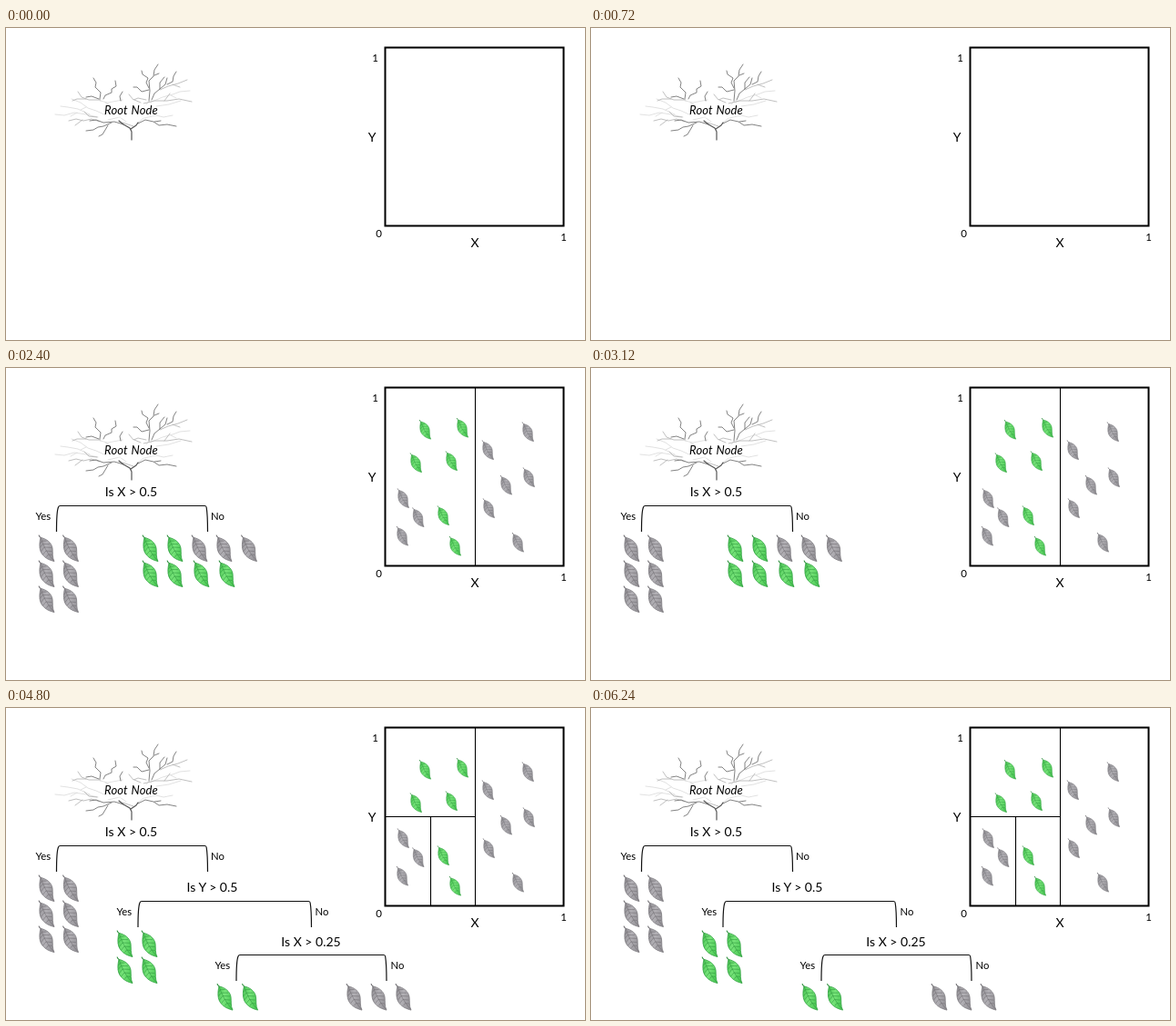
An HTML page for the animation above (7.2 s loop, 636 px wide and 343 px high).

```html
<!DOCTYPE html>
<html lang="en">
<head>
<meta charset="utf-8">
<title>Decision tree</title>
<style>
html, body { margin: 0; width: 100%; height: 100%; overflow: hidden; background: #fff; }
svg { display: block; width: 636px; height: 343px; font-family: Lato, "Open Sans", sans-serif; }
.line { fill: none; stroke: #000; stroke-width: 1.1; }
.bracket { fill: none; stroke: #111; stroke-width: 1.2; }
.twigs { fill: none; stroke-linecap: round; stroke-linejoin: round; }
.root { font-size: 13px; font-style: italic; letter-spacing: .1px; word-spacing: .8px; text-anchor: middle; }
.ask { font-size: 14px; text-anchor: middle; }
.small { font-size: 11.3px; }
.num { font-size: 11.5px; text-anchor: middle; }
.step { opacity: 0; animation: 7200ms step-end infinite; }
.all { animation-name: all; }
.pool { animation-name: pool; }
.x5 { animation-name: x5; }
.x5rest { animation-name: x5rest; }
.y5 { animation-name: y5; }
.y5rest { animation-name: y5rest; }
.x25 { animation-name: x25; }
@keyframes all { 0% { opacity: 0 } 16.6667%, 100% { opacity: 1 } }
@keyframes pool { 0% { opacity: 0 } 16.6667% { opacity: 1 } 33.3333%, 100% { opacity: 0 } }
@keyframes x5 { 0% { opacity: 0 } 33.3333%, 100% { opacity: 1 } }
@keyframes x5rest { 0% { opacity: 0 } 33.3333% { opacity: 1 } 50%, 100% { opacity: 0 } }
@keyframes y5 { 0% { opacity: 0 } 50%, 100% { opacity: 1 } }
@keyframes y5rest { 0% { opacity: 0 } 50% { opacity: 1 } 66.6667%, 100% { opacity: 0 } }
@keyframes x25 { 0% { opacity: 0 } 66.6667%, 100% { opacity: 1 } }
</style>
</head>
<body>
<svg viewBox="0 0 636 343">
  <defs>
    <linearGradient id="greenFill" x1="0" y1="0" x2="1" y2=".35">
      <stop offset="0" stop-color="#4cc655"/><stop offset=".5" stop-color="#78e47a"/><stop offset="1" stop-color="#4fcb58"/>
    </linearGradient>
    <linearGradient id="grayFill" x1="0" y1="0" x2="1" y2=".35">
      <stop offset="0" stop-color="#929095"/><stop offset=".5" stop-color="#b3b1b6"/><stop offset="1" stop-color="#97959a"/>
    </linearGradient>
    <path id="blade" d="M-6-11.6C0-10.4 6-6.4 7 0C7.6 5 6.6 10 9 14.6C4 13.2-.4 11.6-4 7C-7.8 2.4-7.6-5-6-11.6Z"/>
    <path id="stem" d="M-8-14.4Q-7.4-12.6-6-11.6"/>
    <path id="veins" d="M-6-11.6Q-2 2 8.4 13.8M-4.7-7.8L.6-8M-3.5-4.4L4-4.4M-2-1L6.2-.6M-.2 3L6.6 3.6M2.6 7L6.8 7.6M-4.7-7.8L-6.6-5M-3.5-4.4L-6.8-.6M-2-1L-5.6 3.6M-.2 3L-3.2 7M2.6 7L.4 9.8"/>
    <g id="green" fill="none" stroke-width=".8">
      <use href="#blade" fill="url(#greenFill)" stroke="#2fa03f"/>
      <use href="#veins" stroke="#2f9a3e" stroke-width=".6"/>
      <use href="#stem" stroke="#278a36" stroke-width="1.1"/>
    </g>
    <g id="gray" fill="none" stroke-width=".8">
      <use href="#blade" fill="url(#grayFill)" stroke="#7b797e"/>
      <use href="#veins" stroke="#727075" stroke-width=".6"/>
      <use href="#stem" stroke="#68666b" stroke-width="1.1"/>
    </g>
  </defs>

  <rect width="636" height="343" fill="#fff"/>

  <g class="twigs" stroke="#dadada" stroke-width=".8">
    <path d="M110 96L99 91L90 88L82 82L72 78M101 98L88 95L75 93L64 96L54 95M92 95L79 89L68 87L60 86M78 93L71 97"/>
    <path d="M158 82L172 76L183 73L191 70L202 69M152 99L165 96L173 98L183 96M165 86L179 84L192 80M112 101L125 98L132 103M144 105L151 99"/>
    <path d="M109 82L116 86L122 92M158 80L151 87M88 87L82 90M181 74L187 77M103 80L112 82L128 79"/>
  </g>
  <g class="twigs" stroke="#b0b0b0" stroke-width=".8">
    <path d="M151 83L163 80L177 80L190 78L204 81M169 68L178 64L189 61L199 57M183 62L191 65M154 79L145 77L140 79L135 73"/>
    <path d="M103 103L94 100L85 102L77 100L69 102M84 101L76 107M100 98L91 97L86 92M128 104L140 108"/>
    <path d="M104 79L91 79L83 76L79 70M88 78L78 78L73 80M141 79L148 82M174 80L180 72"/>
  </g>
  <g class="twigs" stroke="#747474" stroke-width=".9">
    <path d="M157 80L158 69L157 58L162 53L163 46L167 40M157 66L154 60L156 55L150 51L149 47M157 68L149 70L144 65L140 65M163 52L168 50"/>
    <path d="M160 79L163 72L169 67L169 60L174 54M169 67L175 62L177 55M177 62L183 59L184 53L187 48"/>
    <path d="M103 78L104 71L98 65L99 60L96 55M107 78L109 74L116 71L116 67L121 64L120 58M102 78L94 75L88 76M126 80L125 75L128 70"/>
    <path d="M129 106L119 103L107 104L99 101L92 102M116 104L107 108L101 109L96 112L88 113M112 107L109 112L106 117L102 119"/>
    <path d="M145 105L153 101L162 103L168 107L177 106L187 108M163 103L170 102"/>
  </g>
  <path class="twigs" d="M138 123V114L136 110L129 106L124 102M137 111L143 107L145 104" stroke="#555" stroke-width="1.2"/>
  <ellipse cx="137" cy="91" rx="33" ry="8" fill="#fff" opacity=".75"/>
  <text class="root" x="137.500" y="95">Root Node</text>

  <rect x="416.500" y="21.500" width="196" height="196" fill="none" stroke="#000" stroke-width="2"/>
  <g class="num">
    <text x="405.500" y="37">1</text>
    <text x="409.500" y="229.500">0</text>
    <text x="612.500" y="233.500">1</text>
  </g>
  <text class="ask" x="402" y="125">Y</text>
  <text class="ask" x="515" y="240.500">X</text>

  <g class="step all" id="all"></g>
  <g class="step pool" id="pool"></g>
  <g class="step x5" id="x5">
    <path class="line" d="M515.500 22V217"/>
    <text class="ask" x="137.500" y="141">Is X &gt; 0.5</text>
  </g>
  <g class="step x5rest" id="x5rest"></g>
  <g class="step y5" id="y5">
    <path class="line" d="M417 119.500H515.500"/>
    <text class="ask" x="226.500" y="202">Is Y &gt; 0.5</text>
  </g>
  <g class="step y5rest" id="y5rest"></g>
  <g class="step x25" id="x25">
    <path class="line" d="M466.500 120V217"/>
    <text class="ask" x="335" y="261.500">Is X &gt; 0.25</text>
  </g>
</svg>
<script>
const NS = "http://www.w3.org/2000/svg";

function add(id, tag, attrs, text = "") {
  const el = document.createElementNS(NS, tag);
  for (const key in attrs) el.setAttribute(key, attrs[key]);
  el.textContent = text;
  document.getElementById(id).append(el);
}

function leaf(id, kind, x, y, scale = 1) {
  add(id, "use", { href: "#" + kind, transform: `translate(${x} ${y}) scale(${scale})` });
}

function row(id, kind, y, xs) {
  for (const x of xs) leaf(id, kind, x, y);
}

function branch(id, left, right, top, yesX, noX) {
  const d = `M${left} ${top + 28.5}Q${left} ${top + 6} ${left + 2} ${top + 1.5}Q${left + 2.5} ${top} ${left + 4} ${top}` +
    `H${right - 3}Q${right - 1.5} ${top} ${right - 1.3} ${top + 2}Q${right} ${top + 10} ${right} ${top + 28.5}`;
  add(id, "path", { class: "bracket", d });
  add(id, "text", { class: "small", x: yesX, y: top + 15.5 }, "Yes");
  add(id, "text", { class: "small", x: noX, y: top + 15.5 }, "No");
}

const plot = {
  green: [[460, 67.5], [501, 65.5], [450, 104], [489, 102], [480, 162], [493, 195.5]],
  gray: [[573, 70], [529, 90], [549, 128.5], [574, 120], [530, 154], [436, 143],
    [452.5, 164], [435, 184.5], [562, 191.5]]
};
for (const kind in plot)
  for (const [x, y] of plot[kind]) leaf("all", kind, x, y, .73);

row("pool", "gray", 142.5, [42, 69, 96, 178, 205, 232]);
row("pool", "green", 142.5, [123.5, 151]);
row("pool", "gray", 171, [42, 69, 96]);
row("pool", "green", 171, [123.5, 151, 179.5, 207.5]);

branch("x5", 55.5, 221.5, 151.5, 32.5, 225);
for (const y of [198, 226, 254]) row("x5", "gray", y, [44, 70.5]);
row("x5rest", "green", 198, [158, 185]);
row("x5rest", "gray", 198, [212, 239, 266.5]);
row("x5rest", "green", 226, [158, 185, 214, 242]);

branch("y5", 145, 335.5, 212.5, 121.5, 339.5);
for (const y of [259, 288]) row("y5", "green", y, [130, 157]);
row("y5rest", "gray", 259, [300.5, 327, 354]);
row("y5rest", "green", 288, [302, 329]);

branch("x25", 253, 418, 271.5, 229.5, 422.5);
row("x25", "green", 317.5, [240, 267.5]);
row("x25", "gray", 317.5, [382, 409, 436]);
</script>
</body>
</html>
```
